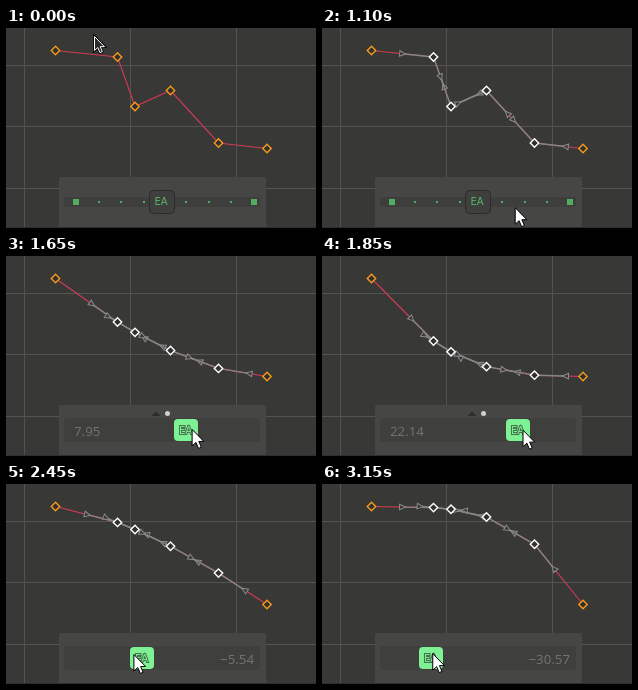
Write an HTML page with a canvas that moves like this. It is 310 by 200 pixels and loops after 3200 ms.

```html
<!DOCTYPE html>
<html>
<head>
<meta charset="utf-8">
<style>
html, body { margin: 0; height: 100%; overflow: hidden; background: #383836; }
canvas { display: block; width: 310px; height: 200px; }
</style>
</head>
<body>
<canvas id="stage" width="310" height="200"></canvas>
<script>
const g = document.getElementById('stage').getContext('2d');
const LOOP = 3200, STEP = 50, SELECT = 550, HOVER = 950, PRESS = 1200, DRAG = 1350;
const KEYS = [[49.5, 22.5], [111.5, 29], [129, 78.5], [164.5, 62.5], [212.5, 115], [261, 120.5]];
const HANDLE = 32, CENTER = 156, LIMIT = 85.4;
const EA_FONT = '10px "DejaVu Sans", sans-serif';
const VALUE_FONT = '13.3px "Open Sans", sans-serif';

// turning points of the drag: time, offset from the slider centre
const DRAG_PATH = [
  [1300, 0], [1400, 11.04], [1450, 12], [1800, 40.2], [1850, 43], [1975, 84],
  [2100, 54.28], [2400, -20.11], [2600, -60], [2800, -60], [2900, -47.238]
];

const mix = (a, b, u) => a + (b - a) * Math.max(0, Math.min(1, u));

function dragAt(t) {
  const i = DRAG_PATH.findIndex(p => p[0] > t);
  if (i < 1) return i ? DRAG_PATH.at(-1)[1] : 0;
  const [a, b] = [DRAG_PATH[i - 1], DRAG_PATH[i]];
  return mix(a[1], b[1], (t - a[0]) / (b[0] - a[0]));
}

function pointerAt(t) {
  if (t < HOVER) {
    const u = t / SELECT;
    return [mix(88.5, 236.5, u), mix(8.5, 145.5, u) + mix(0, 5, (t - 700) / STEP)];
  }
  if (t < PRESS) {
    const u = (t - HOVER) / (PRESS - HOVER);
    return [mix(246, 158, u), mix(158, 172, u) + 14 * Math.sin(Math.PI * u)];
  }
  const d = dragAt(t);
  return [CENTER + 2 + d, 172 + d * 0.05];
}

function shape(points, fill, stroke, open) {
  g.beginPath();
  points.forEach(p => g.lineTo(p[0], p[1]));
  if (!open) g.closePath();
  if (fill) { g.fillStyle = fill; g.fill(); }
  if (stroke) { g.strokeStyle = stroke; g.stroke(); }
}

function box(x, y, w, h, r, fill, stroke) {
  g.beginPath();
  g.roundRect(x, y, w, h, r);
  g.fillStyle = fill;
  g.fill();
  if (stroke) { g.strokeStyle = stroke; g.stroke(); }
}

function label(text, x, y, font, align, color, outline) {
  g.font = font;
  g.textAlign = align;
  if (outline) {
    g.lineWidth = 2;
    g.strokeStyle = outline;
    g.strokeText(text, x, y);
    g.lineWidth = 1;
  }
  g.fillStyle = color;
  g.fillText(text, x, y);
}

function drawGrid() {
  g.fillStyle = '#383836';
  g.fillRect(0, 0, 310, 200);
  g.fillStyle = '#535351';
  for (let x = 18; x < 310; x += 106) g.fillRect(x, 0, 1, 200);
  for (let y = 37; y < 200; y += 61.5) g.fillRect(0, Math.floor(y), 310, 1);
  g.fillStyle = '#332c33';
  g.fillRect(0, 199, 310, 1);
}

// value < 0 eases in, value > 0 eases out
function easedKeys(value) {
  const [x0, y0] = KEYS[0], [x1, y1] = KEYS[5];
  const power = 1 + 0.087 * Math.abs(value);
  return KEYS.map(([x]) => {
    const u = (x - x0) / (x1 - x0);
    return [x, mix(y0, y1, value < 0 ? u ** power : 1 - (1 - u) ** power)];
  });
}

function drawHandle(from, to) {
  g.save();
  g.translate(...from);
  g.rotate(Math.atan2(to[1] - from[1], to[0] - from[0]));
  g.lineWidth = 1.4;
  shape([[0, 0], [HANDLE - 3, 0]], null, '#858585', true);
  g.lineWidth = 1;
  shape([[HANDLE - 4, 0], [HANDLE + 2, -2.8], [HANDLE + 2, 2.8]], '#383836', '#8c8c8c');
  g.restore();
}

function drawCurve(keys, selected) {
  g.lineWidth = 1.15;
  shape(keys, null, '#d03a54', true);
  const inner = i => selected && i > 0 && i < 5;
  keys.forEach((key, i) => {
    if (!inner(i)) return;
    drawHandle(key, keys[i - 1]);
    drawHandle(key, keys[i + 1]);
  });
  g.lineWidth = 1.4;
  keys.forEach(([x, y], i) => {
    shape([[x, y - 4.2], [x + 4.2, y], [x, y + 4.2], [x - 4.2, y]], '#30302f', inner(i) ? '#fff' : '#f59a1c');
  });
  g.lineWidth = 1;
}

function drawIdleSlider() {
  box(58, 169, 196, 10, 3, '#3e3e3d');
  g.fillStyle = '#4fae62';
  for (const side of [-1, 1]) for (let i = 0; i < 4; i++) {
    const x = Math.round(159 + side * (21 + 22.6 * i)), r = i < 3 ? 1 : 3;
    g.fillRect(x - r, 174 - r, 2 * r, 2 * r);
  }
  box(143.5, 162.5, 25, 23, 4, '#3f3f3e', '#2b2b2b');
  label('EA', 155, 177, EA_FONT, 'center', '#52b868');
}

function drawActiveSlider(t, offset, value) {
  box(58, 162, 196, 24, 4, '#3f3f3e');
  const text = Math.abs(value).toFixed(2);
  if (value < 0) label('\u2212' + text, 248, 180, VALUE_FONT, 'right', '#747474');
  else if (t >= DRAG) {
    label(text, 68, 180, VALUE_FONT, 'left', '#747474');
    shape([[145.5, 160], [150, 155.5], [154.5, 160]], '#2d2d2d');
    box(159, 155, 5, 5, 2.5, '#cfcfcf');
  }
  const x = Math.round(CENTER + offset);
  box(x - 12, 163, 24, 22, 4, '#7df194');
  label('EA', x - 0.5, 178, EA_FONT, 'center', '#7df194', '#47724f');
}

// hollow and smaller over the graph, white over the panel
function drawPointer([x, y], hollow) {
  const s = hollow ? 0.85 : 1;
  const arrow = [[0, 0], [0, 16.5], [3.9, 13], [6.4, 19], [9.2, 17.8], [6.7, 12], [11.7, 12]]
    .map(p => [x + p[0] * s, y + p[1] * s]);
  g.lineWidth = hollow ? 2.4 : 1;
  shape(arrow, hollow ? null : '#fff', '#000');
  g.lineWidth = 1;
  if (hollow) shape(arrow, '#2a2a2a', '#fff');
}

function draw(now) {
  const t = Math.floor(((now + 1) % LOOP) / STEP) * STEP;
  const tip = pointerAt(t);
  // the slider trails the pointer by one step
  const offset = Math.max(-LIMIT, Math.min(LIMIT, dragAt(t - STEP)));
  const value = 0.0137 * offset * Math.abs(offset);

  drawGrid();
  drawCurve(t < DRAG ? KEYS : easedKeys(value), t >= SELECT);
  if (t > 0 && t < SELECT) {
    g.strokeStyle = '#8c8c8c';
    g.strokeRect(88.5, 8.5, Math.round(tip[0] - 88.5), Math.round(tip[1] - 8.5));
  }
  if (t < HOVER) drawPointer(tip, true);
  box(53, 149, 207, 50, [2, 2, 0, 0], '#464645');
  if (t < PRESS) drawIdleSlider();
  else drawActiveSlider(t, offset, value);
  if (t >= HOVER) drawPointer(tip, false);
}

const start = performance.now();
function tick() {
  draw(performance.now() - start);
  requestAnimationFrame(tick);
}
tick();
</script>
</body>
</html>
```
